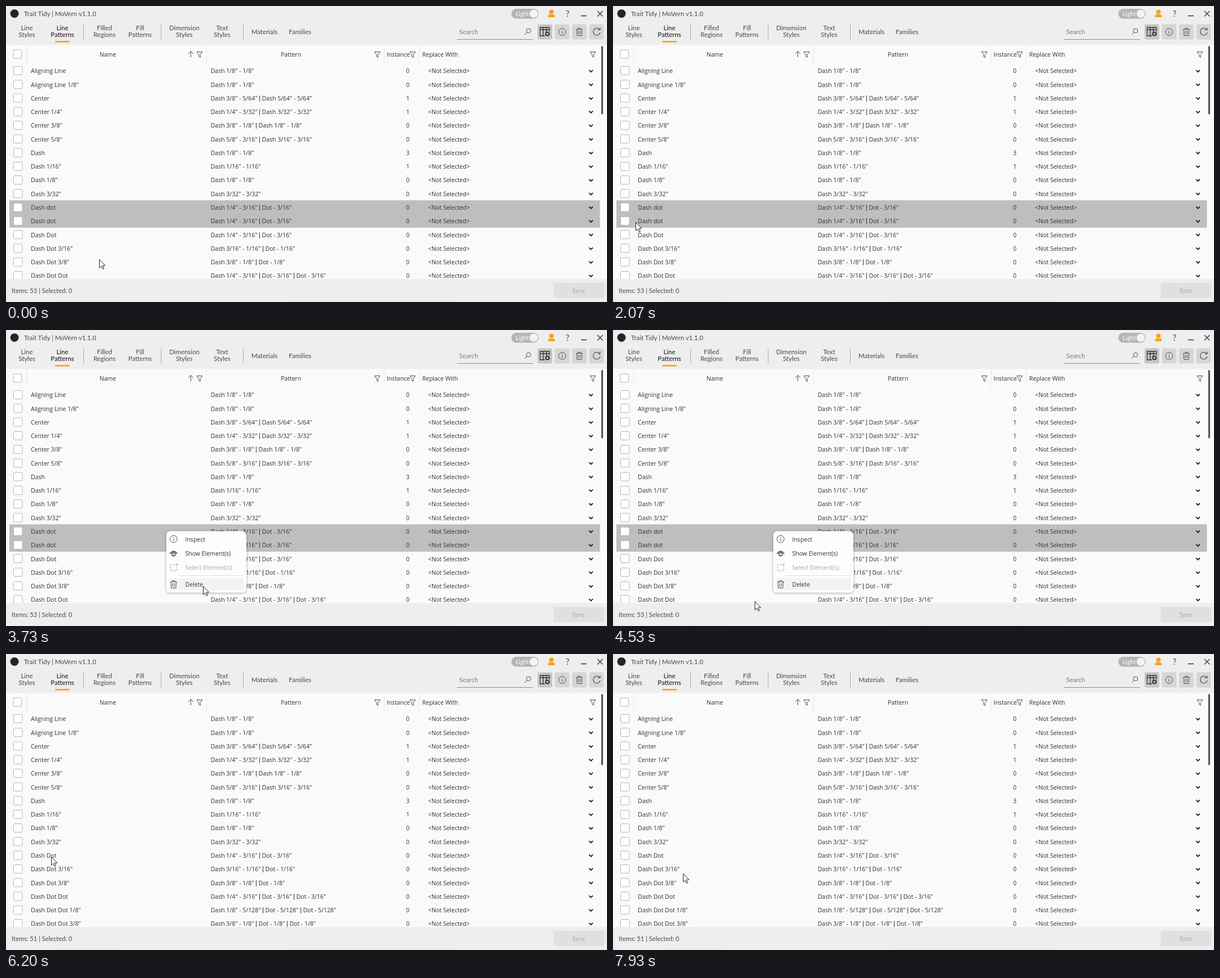
An HTML page for the animation above (8 s loop, 1065 by 526 pixels).

```html
<!DOCTYPE html>
<html lang="en">
<head>
<meta charset="utf-8">
<title>Line patterns</title>
<style>
  html, body { margin: 0; width: 100%; height: 100%; overflow: hidden; background: #eee; }
  svg { display: block; width: 100%; height: 100%; }
  text { font: 10.5px "Open Sans", "Noto Sans", sans-serif; fill: #303030; white-space: pre; }
  .ui { font: 11.4px Lato, sans-serif; fill: #484848; }
  .mid { text-anchor: middle; }
  .bar { font-family: Lato, sans-serif; font-weight: 700; }
  .line { fill: none; stroke: #505050; stroke-width: 1; }
  .box { fill: #fff; stroke: #b4b4b4; }
  .chevron { fill: none; stroke: #222; stroke-width: 1.9; }
  .off { opacity: .42; }
</style>
</head>
<body>
<svg viewBox="0 0 1065 526" preserveAspectRatio="none">
  <defs>
    <clipPath id="tableClip"><rect y="69" width="1065" height="416"/></clipPath>
    <filter id="shadow" x="-20%" y="-20%" width="140%" height="140%">
      <feDropShadow dx="0" dy="1" stdDeviation="2" flood-color="#000" flood-opacity=".35"/>
    </filter>
    <path id="funnel" class="line" d="M-5 -4.5H5L1.3 .3V5.5L-1.3 3.8V.3Z"/>
    <g id="trash" class="line">
      <path d="M-6 -4.5H6M-2.3 -4.5V-6.5H2.3V-4.5M-4.6 -4.5L-4 6.5H4L4.6 -4.5M-1.5 -2V4M1.5 -2V4"/>
    </g>
    <g id="info" class="line"><circle r="6.3"/><path d="M0 -1V3.5M0 -3.5V-2.2"/></g>
    <rect id="button" x="-13" y="-13.5" width="26" height="27" rx="3"/>
  </defs>

  <rect width="1065" height="526" fill="#eee"/>
  <rect y="69" width="1065" height="416" fill="#fafafa"/>

  <g id="titleBar">
    <circle cx="15" cy="13.5" r="7.5" fill="#252525"/>
    <text class="ui" x="32" y="17.5">Trait Tidy | MoVern v1.1.0</text>
    <rect x="895.5" y="5" width="48" height="17.5" rx="8.7" fill="#b4b4b4"/>
    <text class="ui" x="903" y="17.5" style="fill:#fff;font-size:10.8px">Light</text>
    <circle cx="935" cy="13.7" r="7.2" fill="#f4f4f4"/>
    <path d="M960.5 20V18Q960.5 15 964 15H969Q972.5 15 972.5 18V20Z" fill="#f6a31a"/>
    <circle cx="966.5" cy="10.5" r="4" fill="#f6a31a"/>
    <text class="ui mid" x="995" y="18.5" style="font-size:15px">?</text>
    <path class="line" style="stroke:#333;stroke-width:1.3" d="M1019 17.5H1029M1048 9L1057.5 18.5M1057.5 9L1048 18.5"/>
  </g>

  <g id="tabs">
    <path d="M137.5 33V59M275 33V59M420.5 33V59" stroke="#a8a8a8"/>
    <rect x="87" y="62" width="26" height="2.8" rx="1" fill="#f5a623"/>
  </g>

  <g id="tools">
    <text class="ui" x="803" y="50" style="fill:#7d7d7d">Search</text>
    <path d="M799 59.5H934" stroke="#8c8c8c"/>
    <g class="line"><circle cx="926" cy="44" r="3.8"/><path d="M923.2 46.8L919 51"/></g>
    <use href="#button" x="955" y="46" fill="#c6c6c6"/>
    <g fill="#d6d6d6">
      <use href="#button" x="985.5" y="46"/>
      <use href="#button" x="1016" y="46"/>
      <use href="#button" x="1046.5" y="46"/>
    </g>
    <path class="line" style="stroke:#333;stroke-width:1.3" d="M955 53H946.5V38H963V45M946.5 42H963M952 38V53M957.5 38V46"/>
    <circle cx="959.5" cy="49.5" r="3" fill="none" stroke="#333" stroke-width="2.2"/>
    <use href="#info" x="985.5" y="46"/>
    <use href="#trash" x="1016" y="46"/>
    <path class="line" style="stroke-width:1.2" d="M1052 42A6.3 6.3 0 1 0 1053 47M1052.8 38.5V42.5H1048.8"/>
  </g>

  <g id="header">
    <path d="M36.5 69V103M355 69V103M670 69V103M732.5 69V103" stroke="#e7e7e7"/>
    <rect class="box" x="13" y="78" width="15" height="15" rx="2"/>
    <text class="mid" x="180.5" y="90">Name</text>
    <text class="mid" x="505" y="90">Pattern</text>
    <text x="674.5" y="90">Instance</text>
    <text x="737.5" y="90">Replace With</text>
    <path class="line" d="M327.5 91V80.5M323 85L327.5 80.5L332 85"/>
    <use href="#funnel" x="343" y="86"/><use href="#funnel" x="658" y="86"/>
    <use href="#funnel" x="720.5" y="86"/><use href="#funnel" x="1040" y="86"/>
  </g>

  <g clip-path="url(#tableClip)">
    <rect id="selection" x="6" y="345.3" width="1046.5" height="48.6" fill="#bebebe"/>
    <g id="commonRows"></g><g id="beforeRows"></g><g id="afterRows"></g>
  </g>
  <rect id="scroll" x="1054.8" y="71" width="3.2" rx="1.6" fill="#555"/>

  <g id="footer">
    <text id="status" class="ui" x="10" y="509.5" style="font-size:11.1px"></text>
    <rect x="970.5" y="492" width="89.5" height="27" rx="3" fill="#e0e0e0"/>
    <text class="ui mid" x="1015" y="509.5" style="fill:#aaa">Sync</text>
    <path d="M85 525.5H200M495 525.5H790" stroke="#e2e2e2" stroke-dasharray="9 6 14 5"/>
  </g>

  <g id="menu">
    <rect x="284" y="357.5" width="142" height="109" rx="7" fill="#fdfdfd" filter="url(#shadow)"/>
    <rect id="hover" x="289" y="441" width="132" height="21.5" rx="3" fill="#f3f3f3"/>
    <path d="M305 436.5H421" stroke="#dedede"/>
    <use href="#info" x="297" y="371.5"/>
    <g class="line" style="stroke:#333;stroke-width:1.3"><path d="M290.5 398Q297 388.5 303.5 398"/><circle cx="297" cy="398.5" r="3"/></g>
    <path class="line off" style="stroke-width:1.3" stroke-dasharray="3 2" d="M299 417H291.5V428H302.5V421"/>
    <path class="line off" d="M302.5 414.5V419.5M300 417H305"/>
    <use href="#trash" x="297" y="452"/>
    <text x="317.5" y="375.7">Inspect</text>
    <text x="317.5" y="401">Show Element(s)</text>
    <text class="off" x="317.5" y="426">Select Element(s)</text>
    <text x="317.5" y="456">Delete</text>
  </g>
  <path id="cursor" d="M.5 .5V15.3L3.8 12.2L6.2 17.3L8.4 16.3L6.1 11.2H10.8Z" fill="#fff" stroke="#222" stroke-linejoin="round"/>
</svg>

<script>
const $ = id => document.getElementById(id);

const tabs = [
  [37, "Line", "Styles"], [100, "Line", "Patterns", "#111"], [174.5, "Filled", "Regions"],
  [237.5, "Fill", "Patterns"], [316, "Dimension", "Styles"], [383, "Text", "Styles"],
  [458, "Materials"], [521, "Families"]
];
$("tabs").innerHTML += tabs.map(([x, top, bottom, color = "#484848"]) => {
  const label = (y, s) => `<text class="ui mid" x="${x}" y="${y}" style="fill:${color}">${s}</text>`;
  return bottom ? label(43.3, top) + label(55.3, bottom) : label(49.5, top);
}).join("");

// name, dash/dot segments, instance count
const common = [
  ["Aligning Line", `Dash 1/8" - 1/8"`, 0],
  ["Aligning Line 1/8\"", `Dash 1/8" - 1/8"`, 0],
  ["Center", `Dash 3/8" - 5/64" | Dash 5/64" - 5/64"`, 1],
  ["Center 1/4\"", `Dash 1/4" - 3/32" | Dash 3/32" - 3/32"`, 1],
  ["Center 3/8\"", `Dash 3/8" - 1/8" | Dash 1/8" - 1/8"`, 0],
  ["Center 5/8\"", `Dash 5/8" - 3/16" | Dash 3/16" - 3/16"`, 0],
  ["Dash", `Dash 1/8" - 1/8"`, 3],
  ["Dash 1/16\"", `Dash 1/16" - 1/16"`, 1],
  ["Dash 1/8\"", `Dash 1/8" - 1/8"`, 0],
  ["Dash 3/32\"", `Dash 3/32" - 3/32"`, 0]
];
const duplicate = ["Dash dot", `Dash 1/4" - 3/16" | Dot - 3/16"`, 0];
const dotted = [
  ["Dash Dot", `Dash 1/4" - 3/16" | Dot - 3/16"`, 0],
  ["Dash Dot 3/16\"", `Dash 3/16" - 1/16" | Dot - 1/16"`, 0],
  ["Dash Dot 3/8\"", `Dash 3/8" - 1/8" | Dot - 1/8"`, 0],
  ["Dash Dot Dot", `Dash 1/4" - 3/16" | Dot - 3/16" | Dot - 3/16"`, 0],
  ["Dash Dot Dot 1/8\"", `Dash 1/8" - 5/128" | Dot - 5/128" | Dot - 5/128"`, 0],
  ["Dash Dot Dot 3/8\"", `Dash 3/8" - 1/8" | Dot - 1/8" | Dot - 1/8"`, 0]
];

function rowMarkup([name, pattern, count], y) {
  const segments = pattern.replaceAll("|", '<tspan class="bar">|</tspan>');
  return `<g transform="translate(0 ${y})">
    <rect class="box" x="13.5" y="-8" width="15.5" height="15" rx="2"/>
    <text x="44" y="3.8">${name}</text>
    <text x="362.7" y="3.8">${segments}</text>
    <text class="mid" x="712" y="3.8">${count}</text>
    <text x="748" y="3.8">&lt;Not Selected&gt;</text>
    <path class="chevron" d="M1033.3 -1.7L1036.6 1.6L1039.9 -1.7"/></g>`;
}
function fillRows(id, rows, first) {
  $(id).innerHTML = rows.map((row, i) => rowMarkup(row, 115.5 + 24.27 * (first + i))).join("");
}
fillRows("commonRows", common, 0);
fillRows("beforeRows", [duplicate, duplicate, ...dotted.slice(0, 4)], 10);
fillRows("afterRows", dotted, 10);

const LOOP = 8000, STEP = LOOP / 120;
const MENU_OPEN = 46, HOVER = 52, DELETED = 79;

// pointer tip: step, x, y
const track = [
  [0, 165, 450], [2, 120, 405], [4, 66, 368], [6, 170, 360], [8, 299, 362], [10, 210, 366],
  [12, 104, 366], [13, 72, 367], [17, 60, 385], [20, 68, 418], [23, 83, 396], [26, 72, 366],
  [29, 50, 364], [31, 40, 384], [33, 120, 412], [36, 330, 385], [38, 437, 362],
  [39, 437, 362], [42, 439, 357], [45, 439, 357], [47, 452, 368], [49, 450, 400],
  [52, 405, 444], [56, 349, 455], [65, 349, 455], [68, 251, 482], [78, 251, 482],
  [79, 143, 479], [83, 92, 400], [87, 110, 362], [91, 77, 370], [93, 80, 360],
  [95, 240, 368], [97, 414, 420], [99, 320, 508], [102, 150, 440], [111, 150, 440],
  [114, 78, 420], [117, 95, 392], [119, 124, 390], [120, 124, 390]
];

function pointerAt(step) {
  const i = track.findIndex(key => key[0] > step);
  const [s0, x0, y0] = track[i - 1], [s1, x1, y1] = track[i];
  const k = (step - s0) / (s1 - s0);
  return [x0 + (x1 - x0) * k, y0 + (y1 - y0) * k];
}

const show = (id, on) => $(id).setAttribute("visibility", on ? "visible" : "hidden");

function draw(now) {
  // the 5 ms lead absorbs rounding of the step times
  const step = Math.floor(((now + 5) % LOOP) / STEP);
  const deleted = step >= DELETED;
  show("selection", !deleted);
  show("beforeRows", !deleted);
  show("afterRows", deleted);
  show("menu", step >= MENU_OPEN && !deleted);
  show("hover", step >= HOVER && !deleted);
  $("scroll").setAttribute("height", deleted ? 126.5 : 121.5);
  $("status").textContent = `Items: ${deleted ? 51 : 53} | Selected: 0`;
  $("cursor").setAttribute("transform", `translate(${pointerAt(step)})`);
}

let start;
function tick(now) {
  start ??= now;
  draw(now - start);
  requestAnimationFrame(tick);
}
draw(0);
requestAnimationFrame(tick);
</script>
</body>
</html>
```
